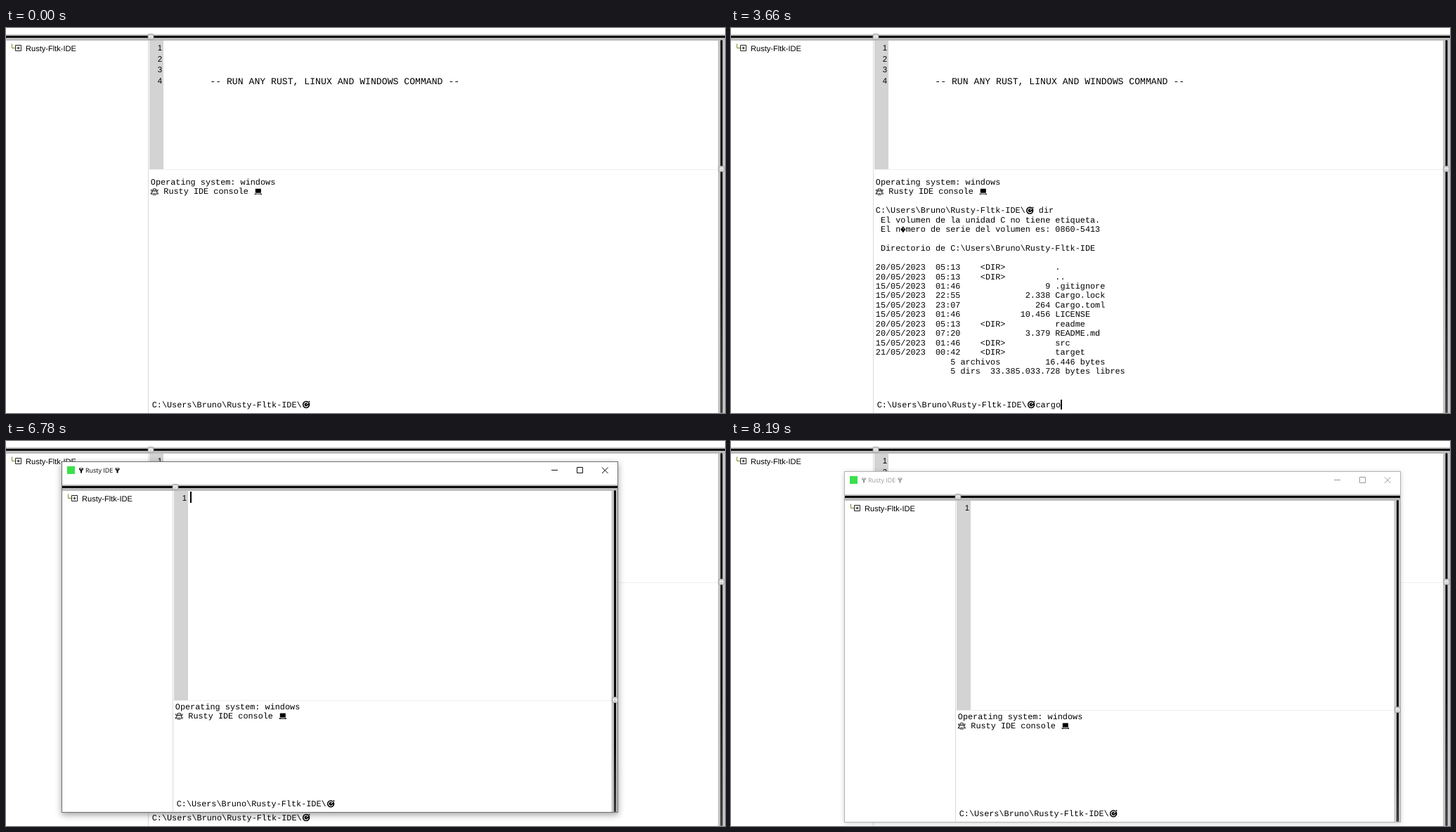
These frames come from a looping animation (1023 by 548 pixels, 8.22 s). An HTML page:

```html
<!DOCTYPE html>
<html lang="en">
<head>
<meta charset="utf-8">
<title>Rusty IDE console</title>
<style>
  html, body { margin: 0; width: 100%; height: 100%; overflow: hidden; background: #fff; }
  svg { display: block; }
  text { white-space: pre; text-rendering: geometricPrecision; fill: #000; }
  .log { font: 11.83px "Liberation Mono", monospace; }
  .code { font: 13.15px "Liberation Mono", monospace; }
  .num { font: 11.4px "Liberation Sans", sans-serif; text-anchor: end; }
  .tree { font: 11.07px "Liberation Sans", sans-serif; }
  .title { font: 8.95px "Open Sans", sans-serif; }
  #frame { fill: #fff; stroke: #707070; filter: drop-shadow(0 3px 5px rgba(0,0,0,.38)); }
  #controls { fill: none; stroke: #111; }
  .idle #frame { stroke: #b4b4b4; filter: drop-shadow(0 1px 3px rgba(0,0,0,.2)); }
  .idle #controls { stroke: #999; }
  .idle .title, .idle .badge { fill: #999; }
</style>
</head>
<body>
<svg id="stage" width="1023" height="548" viewBox="0 0 1023 548">
  <defs>
    <linearGradient id="core" x2="0" y2="1">
      <stop offset=".4" stop-color="#0a0a0a"/>
      <stop offset="1" stop-color="#777"/>
    </linearGradient>
    <g id="target">
      <circle r="5.2"/>
      <path d="M2.6-1.6A3.1 3.1 0 1 0 2.9 1" fill="none" stroke="#fff" stroke-width="1.1"/>
      <path d="M0 .4L3.6-3.4" stroke="#fff" stroke-width="1"/>
      <path d="M2.6-3.2L4.6-5.4L5.6-3.6Z"/>
    </g>
    <g id="robot" fill="none" stroke="#000" stroke-width=".9">
      <path d="M-3-1V-2.5Q-2.6-4.4 0-4.4T3-2.5V-1M-3.4-1H3.4V3.2Q2.8 4.5 0 4.5T-3.4 3.2Z"/>
      <path d="M-4.7-3.4V-1.4L-3.4-.4M4.7-3.4V-1.4L3.4-.4M-4.8 1.2V4M4.8 1.2V4M-1.8 2.6H1.8"/>
      <path d="M-1.3-3V-1.8M1.3-3V-1.8" stroke-width="1.2"/>
    </g>
    <g id="laptop">
      <path d="M-4-4.2H4V1.8H-4ZM-5.2 2.6H5.2V4H-5.2Z"/>
      <path d="M-2.8 3.3H3" stroke="#fff" stroke-width=".5"/>
    </g>
    <path id="badge" d="M-3-3.6H3V-1.6L1 .4V3.6H-1V.4L-3-1.6ZM-1.8-2.7H1.8V-1.8H-1.8Z" fill-rule="evenodd"/>
  </defs>
  <g id="main"></g>
  <g id="popup"></g>
</svg>
<script>
const LOOP = 8220, CHAR = 7.1, LINE = 13.45;
const PATH = 'C:\\Users\\Bruno\\Rusty-Fltk-IDE\\';
const $ = id => document.getElementById(id);

const rect = (x, y, w, h, fill, extra = '') =>
  `<rect x="${x}" y="${y}" width="${w}" height="${h}" fill="${fill}" ${extra}/>`;
const escapeText = s => s.replace(/&/g, '&amp;').replace(/</g, '&lt;');
const text = (cls, x, y, s) => `<text class="${cls}" x="${x}" y="${y}">${escapeText(s)}</text>`;
const icon = (name, x, y) => `<use href="#${name}" class="${name}" x="${x}" y="${y}"/>`;

const prompt = (x, y) => text('log', x, y, PATH) + icon('target', x + 30 * CHAR + 6.4, y - 3.6);

const grip = (x, y) =>
  rect(x - 4, y - 4, 8, 8, '#d0d0d0', 'rx="1.5" stroke="#999" stroke-width=".8"') +
  `<path d="M${x - 2} ${y + 2}V${y - 1}H${x + 2}V${y + 2}" fill="none" stroke="#f8f8f8"/>`;

// Panes shared by both windows: tree, editor gutter and console.
function ide({ x, bar, split, mid, right, end, bottom, lines, logY, promptY }) {
  const box = bar + 12, width = end - x - 1, top = bar + 5.5;
  let s = rect(x + 1, bar - 3.5, width, 2, '#c2c2c2') +
    rect(x + 1, bar - 1.5, width, 3, '#0a0a0a') +
    rect(x + 1, bar + 1.5, width, 4, '#bcbcbc') +
    rect(split, top, 1, bottom - top, '#d9d9d9') +
    rect(split + 2, top, 20, mid - top, '#d3d3d3') +
    rect(split + 2, mid, right - split - 7, 1, '#efefef') +
    rect(right - 5, top, end - right + 5, bottom - top, '#c6c6c6') +
    rect(right - 1.5, bar + 4.5, 3, mid - bar - 4.5, '#0a0a0a', 'rx="1.5"') +
    rect(right - 1.5, mid, 3, bottom - mid, '#0a0a0a', 'rx="1.5"') +
    rect(right - .5, mid, 1, bottom - mid, 'url(#core)') +
    grip(split + 4, bar) + grip(right, mid - .5);
  s += `<path d="M${x + 9.5} ${box - 2}V${box + 4}H${x + 14}" fill="none" stroke="#85852a"/>` +
    `<path d="M${x + 14.5} ${box}h8v8h-8zM${x + 16.5} ${box + 4}h4M${x + 18.5} ${box + 2}v4" fill="#fff" stroke="#222"/>` +
    text('tree', x + 29, bar + 20.4, 'Rusty-Fltk-IDE');
  for (let i = 0; i < lines; i++) s += text('num', split + 20.2, bar + 19.4 + i * 15.75, String(i + 1));
  const left = split + 3.8;
  return s + text('log', left, logY, 'Operating system: windows') +
    icon('robot', left + 5.5, logY + LINE - 3.4) +
    text('log', left + 18.5, logY + LINE, 'Rusty IDE console') +
    icon('laptop', left + 153, logY + LINE - 3.4) +
    prompt(split + 5.7, promptY);
}

const entry = (date, time, size, name) =>
  `${date}/05/2023  ${time}${size ? size.padStart(18) : '    <DIR>'.padEnd(18)} ${name}`;

const listing = [
  ' El volumen de la unidad C no tiene etiqueta.',
  ' El n mero de serie del volumen es: 0860-5413',
  '',
  ' Directorio de ' + PATH.slice(0, -1),
  '',
  entry(20, '05:13', '', '.'),
  entry(20, '05:13', '', '..'),
  entry(15, '01:46', '9', '.gitignore'),
  entry(15, '22:55', '2.338', 'Cargo.lock'),
  entry(15, '23:07', '264', 'Cargo.toml'),
  entry(15, '01:46', '10.456', 'LICENSE'),
  entry(20, '05:13', '', 'readme'),
  entry(20, '07:20', '3.379', 'README.md'),
  entry(15, '01:46', '', 'src'),
  entry(21, '00:42', '', 'target'),
  ' '.repeat(15) + '5 archivos         16.446 bytes',
  ' '.repeat(15) + '5 dirs  33.385.033.728 bytes libres'
];

function output(x, y) {
  const bad = x + 5.5 * CHAR, badY = y + 2 * LINE - 3.5;
  return prompt(x, y) + text('log', x + 232, y, 'dir') +
    listing.map((s, i) => text('log', x, y + (i + 1) * LINE, s)).join('') +
    `<path d="M${bad} ${badY - 4.5}l3.6 4.5l-3.6 4.5l-3.6-4.5z"/>` +
    `<path d="M${bad - 1} ${badY - 1.3}q1-1.2 2 0q0 .8-1 1.5v.6" fill="none" stroke="#fff" stroke-width=".7"/>`;
}

$('main').innerHTML =
  ide({ x: -1, bar: 12.5, split: 202, mid: 201, right: 1018, end: 1023, bottom: 548,
        lines: 4, logY: 223, promptY: 539.6 }) +
  text('code', 290.3, 79.5, '-- RUN ANY RUST, LINUX AND WINDOWS COMMAND --') +
  `<g id="output">${output(205.8, 223 + 3 * LINE)}</g>` +
  text('log', 433.5, 539.6, '').replace('<text', '<text id="typed"') +
  rect(433, 529, 2, 14, '#000', 'id="caret"');

$('popup').innerHTML =
  rect(-.5, -.5, 791, 499, '#fff', 'id="frame"') +
  rect(7, 6, 11, 11, '#3be04b') +
  icon('badge', 27, 12) + text('title', 33, 15.2, 'Rusty IDE') + icon('badge', 78.5, 12) +
  ide({ x: -1, bar: 35.5, split: 157, mid: 339, right: 786.5, end: 790, bottom: 498,
        lines: 1, logY: 351.6, promptY: 490 }) +
  rect(182, 42, 2, 16, '#000', 'id="editCaret"') +
  rect(755, 0, 35, 23, '#e81123', 'id="hover"') +
  `<g id="controls"><path d="M696 11.5h9M732.5 7.5h8v8h-8z"/><path id="cross" d="M768 7.5l8.5 8.5m0-8.5l-8.5 8.5"/></g>`;

// Key times; each command is cleared when it is entered.
const commands = [
  { word: 'dir', keys: [1470, 1710, 1830], enter: 2250 },
  { word: 'cargo run --release', enter: 6240,
    keys: [3000, 3060, 3300, 3510, 3660, 3810, 3960, 4110, 4290, 4440,
           4770, 4890, 5010, 5130, 5340, 5460, 5670, 5850, 6030] }
];
// [time, opacity, scale]
const opening = [[0, 0, 1], [6660, .25, .93], [6690, .55, .96], [6720, .8, .98], [6750, .94, .994], [6780, 1, 1]];
// [time, x, y]
const drag = [[0, 80, 30], [7290, 96, 31], [7320, 112, 32], [7350, 126, 34],
              [7380, 140, 37], [7410, 150, 40], [7470, 158, 42], [7560, 162, 44]];
// [time, opacity]
const hover = [[0, 0], [7800, .25], [7830, .5], [7860, .75], [7920, 1], [8190, 0]];

const stepAt = (steps, t) => steps.findLast(s => s[0] <= t);
const show = (id, on) => $(id).setAttribute('visibility', on ? 'inherit' : 'hidden');

function draw(t) {
  const cmd = commands.find(c => t >= c.keys[0] && t < c.enter);
  const count = cmd ? cmd.keys.filter(k => k <= t).length : 0;
  $('typed').textContent = cmd ? cmd.word.slice(0, count) : '';
  $('caret').setAttribute('x', 433 + Math.round(count * CHAR));
  show('caret', t >= 660 && t < 6600);
  show('output', t >= 2250);

  const [, alpha, scale] = stepAt(opening, t), [, x, y] = stepAt(drag, t), [, red] = stepAt(hover, t);
  const popup = $('popup');
  popup.setAttribute('opacity', alpha);
  show('popup', alpha > 0);
  popup.setAttribute('transform',
    `translate(${x} ${y}) translate(395 249) scale(${scale}) translate(-395 -249)`);
  popup.classList.toggle('idle', t >= 8190);
  show('editCaret', t >= 6780 && t < 8190);
  $('hover').setAttribute('opacity', red);
  $('cross').style.stroke = red > .4 ? '#fff' : '';
}

const start = performance.now();
function tick() {
  draw((performance.now() - start) % LOOP);
  requestAnimationFrame(tick);
}
tick();
</script>
</body>
</html>
```
